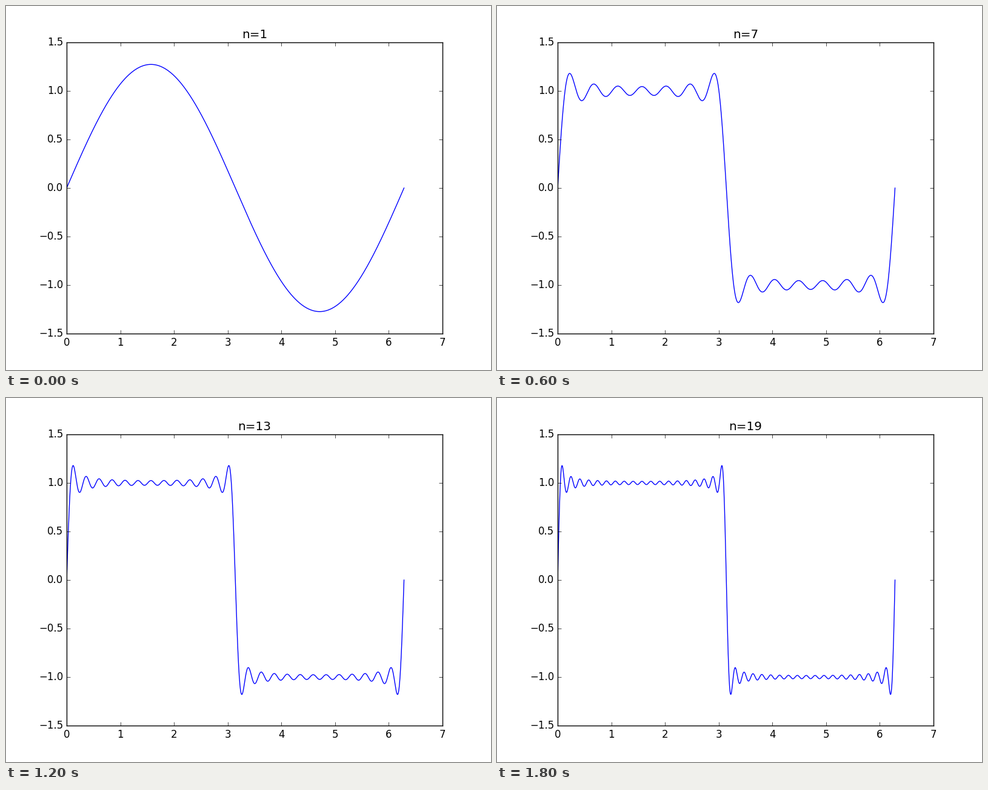
Animation of 800x600 px, one loop 1.9 s. Source, as a matplotlib script:

```python
import numpy as np
import matplotlib.pyplot as plt
from matplotlib.animation import FuncAnimation

TERMS = 19
INTERVAL = 100

plt.style.use("classic")
plt.rcParams["font.family"] = "DejaVu Sans"

x = np.linspace(0, 2 * np.pi, 1000)


def square_wave(n):
    """Fourier series of a square wave, cut after n odd harmonics."""
    odd = 2 * np.arange(n)[:, None] + 1
    return 4 / np.pi * np.sum(np.sin(odd * x) / odd, axis=0)


fig, ax = plt.subplots(figsize=(8, 6), dpi=100, facecolor="white")
ax.set_xlim(0, 7)
ax.set_ylim(-1.5, 1.5)
line, = ax.plot(x, square_wave(1), color="blue", linewidth=1)
title = ax.set_title("n=1")


def update(frame):
    n = frame + 1
    line.set_ydata(square_wave(n))
    title.set_text(f"n={n}")
    return line, title


anim = FuncAnimation(fig, update, frames=TERMS, interval=INTERVAL,
                     repeat=True, repeat_delay=0, blit=False)
plt.show()
```
